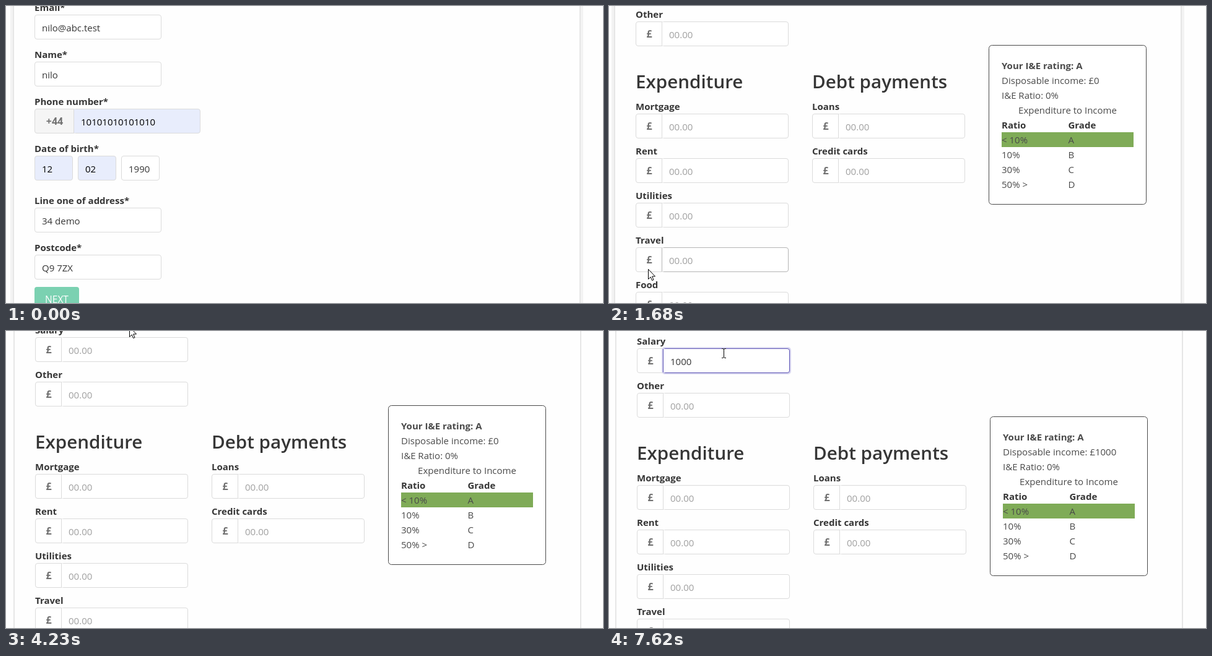
Recreate the animation shown at these times as an HTML page. Size 964 px wide and 480 px high, loop 8 s.

```html
<!DOCTYPE html>
<html lang="en">
<head>
<meta charset="utf-8">
<title>Income form</title>
<style>
html, body { margin: 0; height: 100%; overflow: hidden; background: #fefefe; }
svg { display: block; width: 964px; height: 480px; }
text { font: 15px "Open Sans", "Noto Sans", sans-serif; fill: #363636; white-space: pre; }
.b { font-weight: 700; }
.h { font-size: 29.6px; font-weight: 600; }
.ph { fill: #a0a0a0; }
.pre { font-size: 16px; font-weight: 700; fill: #707070; text-anchor: middle; }
.auto { fill: #000; }
.next { font-size: 15.5px; fill: #fff; text-anchor: middle; }
.card { fill: #4a4a4a; }
.mid { text-anchor: middle; }
.field { stroke: #dbdbdb; }
.hover { stroke: #b5b5b5; }
.focus { stroke: #5c53b5; }
.ring { fill: #d9d7f0; }
</style>
</head>
<body>
<svg id="stage" viewBox="0 0 964 480">
  <g id="edges"></g>
  <g id="person"></g>
  <g id="budget"></g>
  <path id="arrow" d="M.5.5V16.5L4.2 13 6.6 18.6 9 17.5 6.6 12H11.5Z" fill="#fff" stroke="#000"/>
  <path id="beam" d="M-3-7.5H-1L.5-6.5 2-7.5H4M.5-6.5V6.5M-3 7.5H-1L.5 6.5 2 7.5H4" fill="none" stroke="#000"/>
</svg>
<script>
const $ = id => document.getElementById(id);

function add(parent, tag, attrs, content) {
  const el = document.createElementNS("http://www.w3.org/2000/svg", tag);
  for (const k in attrs) el.setAttribute(k, attrs[k]);
  if (content) el.textContent = content;
  return parent.appendChild(el);
}
const text = (g, x, y, s, cls = "") => add(g, "text", { x, y, class: cls }, s);
const block = (g, x, y, width, height, fill, rx = 0) => add(g, "rect", { x, y, width, height, fill, rx });
const outline = (g, x, y, w, h, fill) =>
  add(g, "rect", { x: x + .5, y: y + .5, width: w - 1, height: h - 1, fill, rx: 3.5, class: "field" });

// An input with an optional prefix cell; returns its parts for later changes.
function input(g, x, y, value, { w = 205, cls = "", fill = "#fff", prefix, pw = 43, pfill = "#fff" } = {}) {
  if (prefix) {
    outline(g, x, y, pw + 3, 40, pfill);
    text(g, x + pw / 2 + .5, y + 26, prefix, "pre");
    x += pw - 1;
  }
  const ring = add(g, "rect", { x: x - 2, y: y - 2, width: w + 4, height: 44, rx: 5, class: "ring" });
  const box = outline(g, x, y, w, 40, fill);
  if (prefix) block(g, x + 1, y + 1, 4, 38, fill);
  const edge = prefix && block(g, x, y + 1, 1, 38);
  return { ring, box, edge, value: text(g, x + 12, y + 27, value, cls) };
}

function mark(field, mode) {
  field.ring.style.display = mode === "focus" ? "" : "none";
  field.box.setAttribute("class", "field " + mode);
  if (field.edge) field.edge.setAttribute("fill", { focus: "#5c53b5", hover: "#b5b5b5" }[mode] || "#dbdbdb");
}

// Panel edges, relative to the left side of the form
const strips = [block($("edges"), -39, 0, 5, 480, "#f3f3f3"), block($("edges"), 881, 0, 5, 480, "#f3f3f3")];
block($("edges"), -35, 0, 2, 480, "#e6e6e6");
block($("edges"), 880, 0, 2, 480, "#e6e6e6");

// Personal details
const p = $("person"), fields = {};
const auto = { cls: "auto", fill: "#e8edfc" };
text(p, 258, -3, "y", "b");
[["Email*", 14], ["Name*", 90], ["Phone number*", 166], ["Date of birth*", 242],
 ["Line one of address*", 326], ["Postcode*", 402]].forEach(([s, y]) => text(p, 0, y - 6, s, "b"));
[input(p, 0, 14, "nilo@abc.test"),
 input(p, 0, 90, "nilo"),
 input(p, 0, 166, "10101010101010", { ...auto, prefix: "+44", pw: 64, pfill: "#f5f5f5" }),
 input(p, 0, 242, "12", { ...auto, w: 62 }),
 input(p, 70, 242, "02", { ...auto, w: 62 }),
 input(p, 140, 242, "1990", { w: 62 }),
 input(p, 0, 326, "34 demo"),
 fields.Postcode = input(p, 0, 402, "Q9 7ZX")].forEach(f => mark(f, ""));
block(p, 0, 454, 72, 40, "#7bd1b1", 4);
text(p, 36, 480, "NEXT", "next");

// Income and expenditure, measured from the top of the "Other" input
const b = $("budget");
function money(label, x, y) {
  text(b, x, y - 6, label, "b");
  mark(fields[label] = input(b, x, y, "00.00", { cls: "ph", prefix: "£" }), "");
}
money("Salary", 0, -72);
money("Other", 0, 0);
text(b, 0, 108, "Expenditure", "h");
text(b, 285, 108, "Debt payments", "h");
["Mortgage", "Rent", "Utilities", "Travel", "Food"].forEach((s, i) => money(s, 0, 149 + 72 * i));
["Loans", "Credit cards"].forEach((s, i) => money(s, 285, 149 + 72 * i));
const caret = block(b, 54, -62, 1, 21, "#000");

add(b, "rect", { x: 570.5, y: 38.5, width: 254, height: 257, rx: 5, fill: "#fff", stroke: "#4a4a4a" });
block(b, 591, 179, 213, 24, "#7fab57");
text(b, 591, 77, "Your I&E rating: A", "card b");
const disposable = text(b, 591, 101, "", "card");
text(b, 591, 125, "I&E Ratio: 0%", "card");
text(b, 697.5, 149, "Expenditure to Income", "card mid");
[["Ratio", "Grade"], ["< 10%", "A"], ["10%", "B"], ["30%", "C"], ["50% >", "D"]].forEach((row, i) =>
  row.forEach((s, j) => text(b, 591 + 107.5 * j, 173 + 24 * i, s, i ? "card" : "b")));

// Hard steps: time, then the state held from that time on
const scroll = [ // x, y of the form
  [0, 46, 0], [130, 45, -18], [280, 45, -32], [430, 44, -48], [550, 43, -55],
  [1680, 43, 25], [3080, 46, 60], [3200, 46, 67], [3330, 47, 73], [3450, 47, 77],
  [3600, 47, 79], [3850, 47, 80], [4100, 47, 81], [4230, 47, 82], [5020, 46, 94], [5140, 45, 100]];
const pointer = [ // shape, x, y, hovered input
  [0], [980, "arrow", 163, 187], [1105, "arrow", 14, 462], [1230, "arrow", 42, 448],
  [1380, "arrow", 63, 425], [1680, "arrow", 63, 425, "Travel"], [2100, "arrow", 150, 140],
  [2230, "beam", 215, 40, "Other"], [2370, "arrow", 228, 4], [2500, "arrow", 237, -8], [2650],
  [4230, "arrow", 199, -7], [4380, "arrow", 209, -8], [4500, "arrow", 217, -9], [4650, "arrow", 217, -14], [4880],
  [5290, "arrow", 205, 4], [5410, "beam", 190, 33, "Salary"], [5530, "beam", 185, 36]];
const typed = [[0, 0], [6070, 1], [6480, 2], [6630, 3], [7040, 4]];
const at = (list, t) => list.findLast(k => t >= k[0]);
const show = (el, on) => el.style.display = on ? "" : "none";

function draw(now) {
  const t = now % 8000;
  const second = t >= 1680;
  const [, x, y] = at(scroll, t);
  const [, shape, px, py, hovered] = at(pointer, t);
  const count = at(typed, t)[1];

  $("edges").setAttribute("transform", `translate(${x} 0)`);
  strips.forEach(s => show(s, t < 3080));
  show(p, !second);
  show(b, second);
  (second ? b : p).setAttribute("transform", `translate(${x} ${y})`);

  for (const id of ["arrow", "beam"]) {
    show($(id), shape === id);
    if (shape === id) $(id).setAttribute("transform", `translate(${px} ${py})`);
  }

  const focused = t >= 5530 ? "Salary" : t >= 1540 && !second ? "Postcode" : "";
  for (const name of ["Postcode", "Salary", "Other", "Travel"])
    mark(fields[name], name === focused ? "focus" : name === hovered ? "hover" : "");

  const amount = "1000".slice(0, count);
  fields.Salary.value.textContent = amount || "00.00";
  fields.Salary.value.setAttribute("class", count ? "" : "ph");
  disposable.textContent = "Disposable income: £" + (t >= 6190 ? amount : "0");
  caret.setAttribute("x", 54 + Math.round(8.5 * count));
  show(caret, t >= 5530 && t < 7620);
  requestAnimationFrame(draw);
}
draw(0);
</script>
</body>
</html>
```
